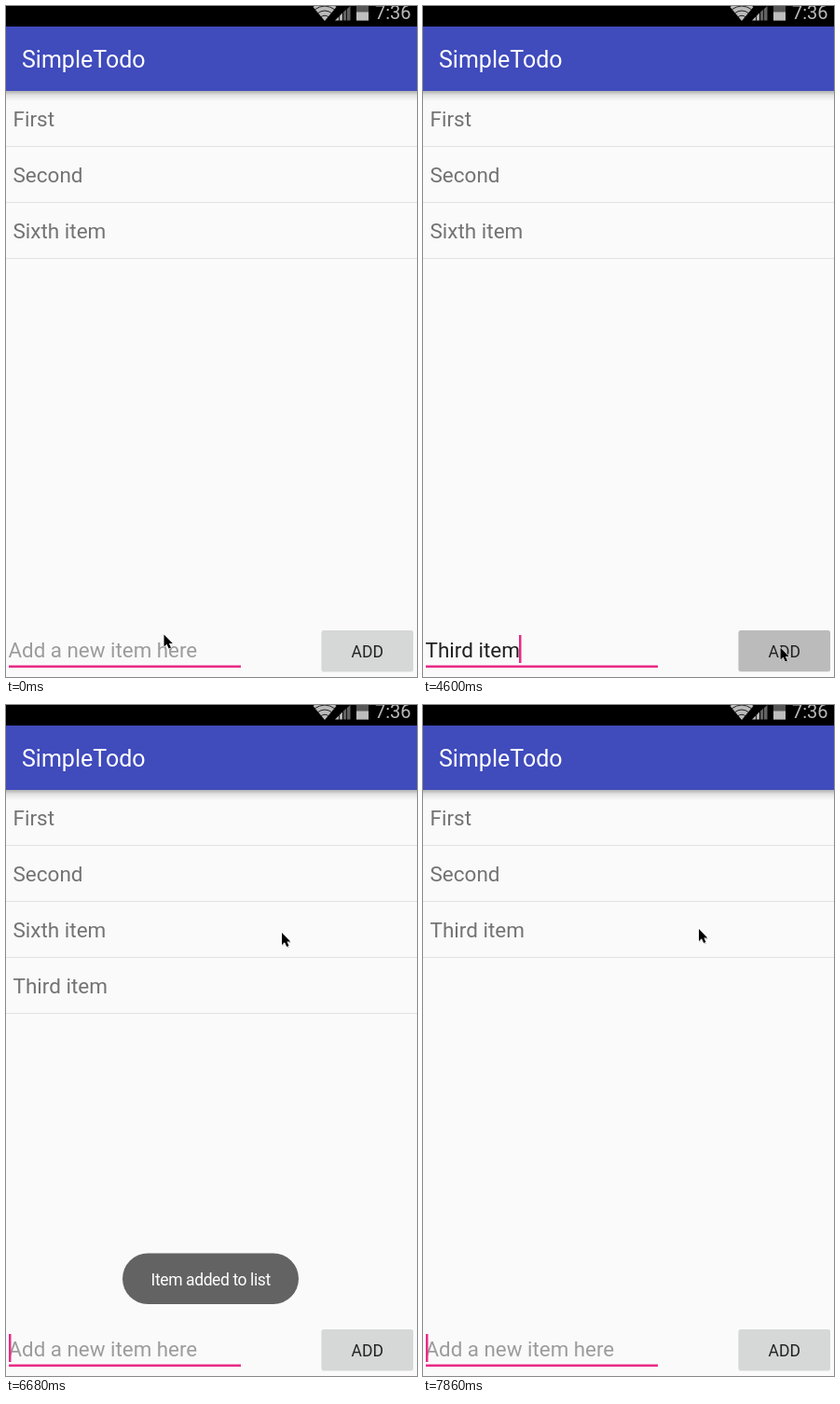
Animation of 441x719 px, one loop 8000 ms. Source, as an HTML page:

```html
<!DOCTYPE html>
<html lang="en">
<head>
<meta charset="utf-8">
<title>Todo list</title>
<style>
  html, body { margin: 0; width: 100%; height: 100%; overflow: hidden; background: #fafafa; }
  svg { display: block; width: 441px; height: 719px; }
  text { font-family: Roboto, sans-serif; font-size: 22.5px; white-space: pre; }
  .item { fill: #737373; }
  .pink { fill: #ea2a86; }
</style>
</head>
<body>
<svg viewBox="0 0 441 719">
  <defs>
    <linearGradient id="shade" x2="0" y2="1">
      <stop offset="0" stop-opacity=".3"/>
      <stop offset=".4" stop-opacity=".1"/>
      <stop offset="1" stop-opacity="0"/>
    </linearGradient>
  </defs>
  <rect width="441" height="719" fill="#fafafa"/>

  <g id="list"></g>

  <rect y="91" width="441" height="11" fill="url(#shade)"/>
  <rect width="441" height="22"/>
  <rect y="22" width="441" height="69" fill="#404bbc"/>
  <text x="17" y="66" fill="#fff" style="font-size:25px">SimpleTodo</text>

  <!-- status icons -->
  <path d="M342 16L329.500 1Q342 -8 354.500 1Z" fill="#b9b9b9"/>
  <path d="M331 4Q342 -4 353 4M334 8Q342 2 350 8M337.500 12Q342 8.500 346.500 12" fill="none" stroke="#222" stroke-width="1"/>
  <path d="M353 15.500L361 7.500V15.500Z" fill="#b5b5b5"/>
  <path d="M362 15.500V6.500L369.500 0V15.500Z" fill="#626262"/>
  <path d="M357.500 16V0M361.500 16V0M365.500 16V0" stroke="#000" stroke-width=".8"/>
  <rect x="376" width="13" height="15.500" fill="#565656"/>
  <rect x="376" y="6.500" width="13" height="9" fill="#bdbdbd"/>
  <text x="396" y="14" fill="#b8b8b8" style="font-size:20px">7:36</text>

  <!-- entry row -->
  <text id="hint" x="2.500" y="698" fill="#9c9c9c" style="font-size:22.350px">Add a new item here</text>
  <text id="entry" x="2.500" y="698" fill="#212121"></text>
  <rect class="pink" x="3" y="706.500" width="249" height="2.500"/>
  <rect id="caret" class="pink" y="674" width="2.500" height="30"/>
  <rect x="338.500" y="670" width="98.500" height="44" rx="2.500" fill="#000" opacity=".06"/>
  <rect id="button" x="338.500" y="669" width="98.500" height="44" rx="2.500"/>
  <text x="387.800" y="698" text-anchor="middle" fill="#222" style="font-size:17.500px">ADD</text>

  <g id="toast">
    <rect x="125" y="587.500" width="189" height="54.500" rx="27.250" fill="#636363"/>
    <text x="219.700" y="621.500" text-anchor="middle" fill="#fff" style="font-size:17.500px;letter-spacing:-.4px">Item added to list</text>
  </g>

  <g id="pointer">
    <path d="M1 2V15L4 12.200L6.200 17L8.800 16L6.600 11.400H10.500Z" opacity=".2"/>
    <path d="M.5 .5V13.500L3.500 10.800L5.700 15.600L8 14.600L5.900 10H9.800Z" stroke="#fff" stroke-width="1.100" paint-order="stroke"/>
  </g>
</svg>
<script>
const LOOP = 8000;
const NEW_ITEM = 'Third item';
const ADDED = 4750, REMOVED = 7720;
const $ = id => document.getElementById(id);
const [list, hint, entry, caret, button, toast, pointer] =
  ['list', 'hint', 'entry', 'caret', 'button', 'toast', 'pointer'].map($);

// each row is [start time, ...values], held until the next row
const pointerSteps = [
  [0, 169, 673], [1340, 164, 688], [1490, 153, 702], [1640, 147, 695],
  [3720, 162, 692], [3870, 268, 674], [4010, 356, 668], [4160, 383, 687],
  [4900, 385, 640], [5050, 322, 292], [5190, 294, 250], [5340, 289, 232],
  [5490, 288.5, 229], [5640, 292, 243], [5790, 294, 245], [5940, 295.5, 243.5],
  [7720, 295.5, 241], [7860, 295.5, 239.5]
];
const typedSteps = [
  [0, 0], [2230, 1], [2380, 2], [2530, 3], [2670, 4], [2820, 6],
  [2970, 8], [3120, 9], [3270, 10], [ADDED, 0]
];
const toastSteps = [
  [0, 0], [4750, .12], [4900, .45], [5050, .75], [5190, 1],
  [6980, .6], [7120, .26], [7270, 0]
];
const pressSteps = [[0, 0], [7270, .1], [7420, .15], [7570, .2], [REMOVED, 0]];
const caretOn = [
  [450, 900], [1340, 1940], [2230, 3720], [4160, 5340],
  [5790, 6230], [6680, 7120], [7570, LOOP]
];

const at = (steps, t) => steps.filter(s => s[0] <= t).pop().slice(1);
const show = (el, on) => el.setAttribute('visibility', on ? 'visible' : 'hidden');

function add(tag, attrs) {
  const el = document.createElementNS('http://www.w3.org/2000/svg', tag);
  for (const key in attrs) el.setAttribute(key, attrs[key]);
  return list.appendChild(el);
}

const press = add('rect', { y: 211, width: 441, height: 59 });
const rows = [0, 1, 2, 3].map(i => ({
  label: add('text', { class: 'item', x: 7.5, y: 129 + 60 * i }),
  line: add('rect', { y: 150 + 60 * i, width: 441, height: 1, fill: '#e1e1e1' })
}));

function itemsAt(t) {
  const items = ['First', 'Second'];
  if (t < REMOVED) items.push('Sixth item');
  if (t >= ADDED) items.push(NEW_ITEM);
  return items;
}

function draw(t) {
  const items = itemsAt(t);
  rows.forEach((row, i) => {
    row.label.textContent = items[i] || '';
    show(row.line, i < items.length);
  });
  press.setAttribute('opacity', at(pressSteps, t)[0]);

  const typed = at(typedSteps, t)[0];
  entry.textContent = NEW_ITEM.slice(0, typed);
  show(hint, !typed);
  const end = typed ? 1.5 + entry.getComputedTextLength() : 3;
  caret.setAttribute('x', Math.max(3, Math.round(end)));
  show(caret, caretOn.some(([a, b]) => t >= a && t < b));

  button.setAttribute('fill', t >= 4600 && t < ADDED ? '#babbba' : '#d6d7d7');
  toast.setAttribute('opacity', at(toastSteps, t)[0]);
  pointer.setAttribute('transform', `translate(${at(pointerSteps, t)})`);
}

const start = performance.now();
function tick() {
  draw((performance.now() - start) % LOOP);
  requestAnimationFrame(tick);
}
tick();
</script>
</body>
</html>
```
